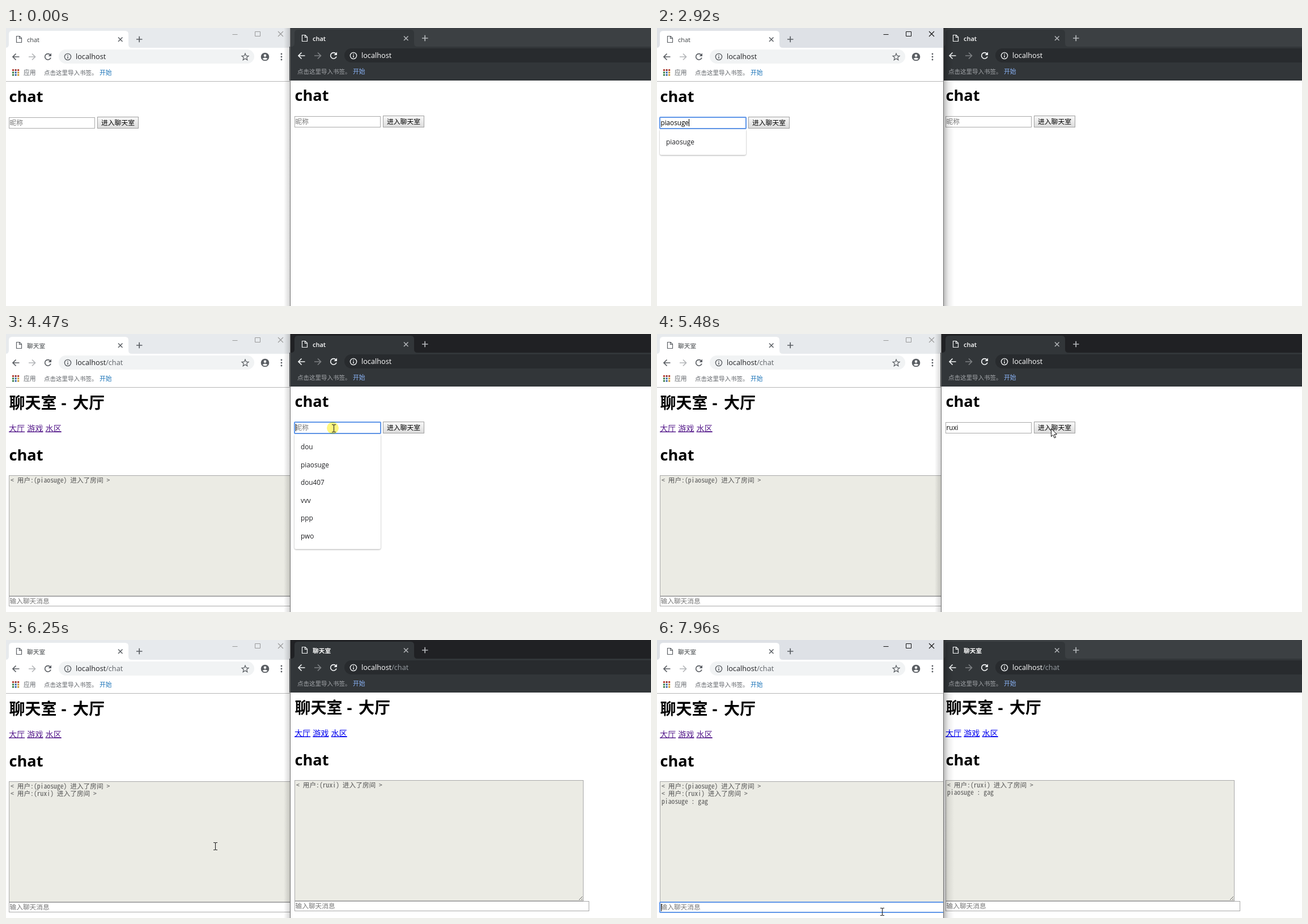
Write an HTML page that moves like this. It is 1138 px wide and 492 px high and loops after 8 s.

```html
<!DOCTYPE html>
<html lang="zh-CN">
<head>
<meta charset="utf-8">
<title>chat</title>
<style>
html, body { margin: 0; width: 100%; height: 100%; overflow: hidden; background: #fff; }
svg { display: block; }
text { font-family: "Open Sans", "Noto Sans CJK SC", "Noto Sans CJK", sans-serif; white-space: pre; }
.b { font-weight: 700; }
.semi { font-weight: 600; }
.log { font-family: "Noto Sans Mono CJK SC", "Noto Sans CJK SC", "Liberation Mono", monospace; }
.u { text-decoration: underline; }
</style>
</head>
<body>
<svg width="1138" height="492" viewBox="0 0 1138 492">
  <defs>
    <linearGradient id="btn" x2="0" y2="1"><stop stop-color="#f8f8f8"/><stop offset="1" stop-color="#dcdcdc"/></linearGradient>
    <linearGradient id="fadeR"><stop stop-opacity=".26"/><stop offset=".45" stop-opacity=".08"/><stop offset="1" stop-opacity="0"/></linearGradient>
    <linearGradient id="fadeL"><stop stop-opacity="0"/><stop offset="1" stop-opacity=".16"/></linearGradient>
    <filter id="soft" x="-10%" y="-10%" width="120%" height="120%"><feDropShadow dx="0" dy="1" stdDeviation="1.3" flood-opacity=".4"/></filter>
  </defs>
  <g id="scene"></g>
</svg>
<script>
const LOOP = 8000;
const OFFSET = { x: 504, y: -2 };
const FIELD = 11.7;
const host = "piaosuge", guest = "ruxi", reply = "gag";
const leftNames = ["dou", "dou407", host, "vvv", "ppp", "pwo"];
const rightNames = ["dou", host, "dou407", "vvv", "ppp", "pwo"];

const light = {
  bar: "#dee1e6", idle: "#e7eaed", tool: "#fff", pill: "#f1f3f4", icon: "#5a5e63", off: "#b4b6b9", tab: "#5a5e63",
  title: "#3c4043", weight: "", url: "#202124", path: "#5f6368", note: "#5f6368", go: "#1a73b8", link: "#551a8b"
};
const dark = {
  bar: "#202124", idle: "#3c4043", tool: "#323639", pill: "#282b2e", icon: "#f1f3f4", off: "#7d8083", tab: "#b4b7ba",
  title: "#fff", weight: "semi", url: "#fff", path: "#9aa0a6", note: "#a3a6aa", go: "#8ab4f8", link: "#0000ee"
};

const pen = document.createElement("canvas").getContext("2d");
const textWidth = s => {
  pen.font = `${FIELD}px "Open Sans", "Noto Sans CJK SC", sans-serif`;
  return pen.measureText(s).width;
};
const esc = s => s.replace(/</g, "&lt;").replace(/>/g, "&gt;");
const text = (x, y, s, size, fill, cls = "") =>
  `<text x="${x}" y="${y}" font-size="${size}" fill="${fill}" class="${cls}">${esc(s)}</text>`;
const rect = (x, y, w, h, fill, more = "") =>
  `<rect x="${x}" y="${y}" width="${w}" height="${h}" fill="${fill}" ${more}/>`;
const line = (d, stroke, w = 1.6) => `<path d="${d}" fill="none" stroke="${stroke}" stroke-width="${w}"/>`;
const during = (t, a, b) => t >= a && t < b;
const pick = (t, steps) => steps.filter(s => s[0] <= t).pop()[1];

function tabShape(x, w) {
  const r = x + w;
  return `M${x - 6} 35Q${x} 35 ${x} 29V11Q${x} 5 ${x + 6} 5H${r - 6}Q${r} 5 ${r} 11V29Q${r} 35 ${r + 6} 35Z`;
}

function chrome(c, title, path, pillWidth) {
  const shift = 123 + textWidth("localhost") * 12.7 / FIELD;
  return `<path d="${tabShape(5, 211)}" fill="${c.tool}"/>`
    + rect(-4, 35, 700, 60, c.tool)
    + line("M18.5 14.5H24L27.5 18V25.5H18.5ZM23.5 14.5V18.5H27.5", c.icon, 1.2)
    + text(37, 24.5, title, title === "chat" ? 11 : 10.7, c.title, c.weight)
    + line("M198 16.5L205.5 24M205.5 16.5L198 24", c.tab, 1.5)
    + line("M230 20H240.5M235.2 14.8V25.2", c.tab, 1.7)
    + line("M23.5 51H12.5M17.5 45.5L12 51L17.5 56.5", c.icon, 1.7)
    + line("M40 51H51M46 45.5L51.5 51L46 56.5", c.off, 1.7)
    + line("M78 47.5A5.3 5.3 0 1 0 79 52.5", c.icon, 1.7)
    + `<path d="M80 44.5V50H74.5Z" fill="${c.icon}"/>`
    + rect(93, 38, pillWidth, 25, c.pill, 'rx="12.5"')
    + `<circle cx="109" cy="51" r="5.6" fill="none" stroke="${c.icon}" stroke-width="1.4"/>`
    + line("M109 47.5V49M109 50.2V54.3", c.icon, 1.5)
    + text(123, 55.3, "localhost", 12.7, c.url)
    + text(shift, 55.3, path, 12.7, c.path);
}

function bookmarks(x, c) {
  return text(x, 83, "点击这里导入书签。", 10.5, c.note) + text(x + 98, 83, "开始", 10.8, c.go);
}

function field(x, y, w, h, s, hint, focus) {
  const base = y + h / 2 + 4.3;
  let out = rect(x + .5, y + .5, w - 1, h - 1, "#fff", 'stroke="#a9a9a9"');
  if (focus) out += rect(x, y, w, h, "none", 'rx="1" stroke="#5f96e8" stroke-width="2"');
  out += s ? text(x + 1.5, base, s, FIELD, "#000") : text(x + 1.5, base, hint, FIELD, "#757575");
  if (focus) out += rect(Math.round(x + 2 + textWidth(s)), y + 3, 1, 13, "#000");
  return out;
}

function dropdown(items) {
  if (!items.length) return "";
  return rect(5, 179, 152, 14 + 31.6 * items.length, "#fff", 'rx="3" filter="url(#soft)"')
    + items.map((s, i) => text(16, +(206 + 31.6 * i).toFixed(1), s, 11.8, "#202124")).join("");
}

const heading = (x, y, s) => text(x, y, s, s === "chat" ? 27.2 : 28, "#000", "b");

function loginPage(p) {
  return heading(5.5, 131, "chat")
    + field(5, 158, 152, 20, p.value, "昵称", p.focus)
    + rect(161.5, 157.5, 72, 20, "url(#btn)", 'stroke="#a0a0a0"')
    + text(168, 172, "进入聊天室", 11.8, "#000")
    + (p.open ? dropdown(p.names.filter(n => n.startsWith(p.value))) : "");
}

function chatPage(p, color) {
  return heading(5.5, 132, "聊天室")
    + (p.joined ? heading(97.5, 132, "-") + heading(118, 132, "大厅") : "")
    + ["大厅", "游戏", "水区"].map((s, i) => text(5 + 32.3 * i, 171.5, s, 14.1, color, "u")).join("")
    + heading(5.5, 224, "chat")
    + rect(5.5, 250.5, 509, 213, "#ebebe4", 'stroke="#a9a9a9"')
    + line("M507 462L513 456M511 462L513 460", "#666", 1)
    + p.log.map((s, i) => text(8, +(263 + 13.4 * i).toFixed(1), s, FIELD, "#545454", "log")).join("")
    + field(5, 464, 520, 18, p.message, "输入聊天消息", p.writing);
}

const content = (p, c) => p.chat ? chatPage(p, c.link) : loginPage(p);

function leftWindow(p, active) {
  const c = light, ink = active ? "#111" : "#999";
  const dots = ["#b5372c", "#8a2f2a", "#b5372c", "#3a7d44", "#2f5fa8", "#c8962e", "#3a7d44", "#2f5fa8", "#c8962e"];
  return `<svg width="505" height="492">` + rect(0, 0, 505, 492, "#fff")
    + rect(0, 0, 505, 35, active ? c.bar : c.idle)
    + line("M399.5 11.5H408.5", ink, 1) + line("M439.5 6.5H448.5V14.5H439.5Z", ink, 1)
    + line("M480 6L489 15M489 6L480 15", ink, 1.1)
    + chrome(c, p.chat ? "聊天室" : "chat", p.chat ? "/chat" : "", 345)
    + line("M422 45L423.7 49.2L428 49.5L424.7 52.3L425.8 56.6L422 54.2L418.2 56.6L419.3 52.3L416 49.5L420.3 49.2Z", c.icon, 1.2)
    + `<circle cx="457" cy="51" r="7.3" fill="${c.icon}"/><circle cx="457" cy="48.7" r="2.3" fill="#fff"/><path d="M452.5 54.5Q457 50.5 461.5 54.5Q457 58.5 452.5 54.5Z" fill="#fff"/>`
    + [46, 51, 56].map(y => `<circle cx="486" cy="${y}" r="1.4" fill="${c.icon}"/>`).join("")
    + dots.map((d, i) => rect(11 + i % 3 * 4.6, 73 + Math.floor(i / 3) * 4.3, 3, 3, d)).join("")
    + text(31, 83, "应用", 10.8, c.note) + bookmarks(67, c)
    + rect(0, 94, 505, 1, "#b6b6b6")
    + content(p, c) + `</svg>`
    + (active ? rect(505, 0, 1, 492, "#707070") + rect(506, 0, 18, 492, "url(#fadeR)") : "");
}

function rightWindow(p, active) {
  const c = dark;
  return rect(490, 0, 11, 492, "url(#fadeL)")
    + rect(501, 0, 637, 492, "#fff") + rect(501, 0, 637, 36, active ? c.bar : c.idle)
    + `<g transform="translate(${OFFSET.x} ${OFFSET.y})">`
    + chrome(c, p.chat ? "聊天室" : "chat", p.chat ? "/chat" : "", 600)
    + bookmarks(10, c) + content(p, c) + `</g>`
    + rect(501, 0, 1, 492, "#707070");
}

// first step, last step, number of steps, start point, end point
const moves = [
  [70, 460, 6, [933, 481], [27, 146]],
  [530, 610, 2, [27, 146], [45, 172]],
  [3850, 4390, 8, [45, 172], [578, 167]],
  [4940, 5240, 5, [578, 167], [695, 167]],
  [5630, 5710, 2, [695, 167], [664, 178]],
  [5800, 6490, 10, [664, 178], [208, 466]],
  [7730, 7960, 4, [208, 466], [397, 481]]
];

function pointerAt(t) {
  const [a, b, n, from, to] = moves.filter(m => m[0] <= t).pop();
  const k = Math.min(n, Math.floor((t - a) / (b - a) * (n - 1) + .001) + 1) / n;
  const e = k * k * (3 - 2 * k);
  return from.map((v, i) => Math.round(v + (to[i] - v) * e));
}

function overField(x, y, left, right) {
  const onRight = x > 502, p = onRight ? right : left;
  const px = onRight ? x - OFFSET.x : x, py = onRight ? y - OFFSET.y : y;
  return p.chat ? px > 5 && px < 525 && py > 250 && py < 484 : px > 5 && px < 157 && py > 158 && py < 178;
}

function pointer(t, left, right) {
  const typing = during(t, 2230, 3300) || during(t, 4560, 4940) || during(t, 6950, 7730);
  if (t < 70 || typing) return "";
  const [x, y] = pointerAt(t);
  const press = during(t, 1770, 1920) || during(t, 4470, 4560) || during(t, 5320, 5400) || during(t, 6640, 6720);
  const beam = during(t, 610, 3850) || overField(x, y, left, right);
  const halo = press ? `<circle cx="${x - 1.5}" cy="${y - .7}" r="10.5" fill="#fff566" opacity=".85" style="mix-blend-mode:multiply"/>` : "";
  return halo + `<g transform="translate(${x} ${y})">` + (beam
    ? line("M-3 -6.5H-.8L.5 -5.8L1.8 -6.5H4M.5 -5.8V5.8M-3 6.5H-.8L.5 5.8L1.8 6.5H4", "#222", 1.1)
    : `<path d="M.5 .5V14.5L3.8 11.5L6.2 17L8.5 16L6.1 10.6H10.5Z" fill="#fff" stroke="#111"/>`) + `</g>`;
}

function scene(t) {
  const enter = who => `< 用户:(${who}) 进入了房间 >`;
  const focus = pick(t, [[0, ""], [1770, "left"], [4470, "right"], [6640, "left"]]);
  const said = t >= 7730 ? [`${host} : ${reply}`] : [];
  const met = t >= 5800 ? [enter(guest)] : [];
  const left = {
    chat: t >= 3300, joined: t >= 3620, names: leftNames,
    value: host.slice(0, pick(t, [[0, 0], [2230, 1], [2310, 3], [2460, 4], [2540, 5], [2690, 6], [2770, 7], [2920, 8]])),
    focus: t >= 1770, open: during(t, 1770, 1920) || t >= 2230,
    log: [...(t >= 3620 ? [enter(host)] : []), ...met, ...said],
    message: reply.slice(0, pick(t, [[0, 0], [6950, 1], [7030, 2], [7180, 3], [7730, 0]])),
    writing: t >= 6640
  };
  const right = {
    chat: t >= 5550, joined: t >= 5800, names: rightNames,
    value: guest.slice(0, pick(t, [[0, 0], [4560, 1], [4620, 2], [4790, 3], [4940, 4]])),
    focus: during(t, 4470, 5320), open: during(t, 4470, 4560),
    log: [...met, ...said], message: "", writing: false
  };
  const a = leftWindow(left, focus === "left"), b = rightWindow(right, focus === "right");
  return (focus === "left" ? b + a : a + b) + pointer(t, left, right);
}

const stage = document.getElementById("scene");
const start = performance.now();
let shown = "";
function tick() {
  const next = scene((performance.now() - start) % LOOP);
  if (next !== shown) stage.innerHTML = shown = next;
  requestAnimationFrame(tick);
}
tick();
</script>
</body>
</html>
```
